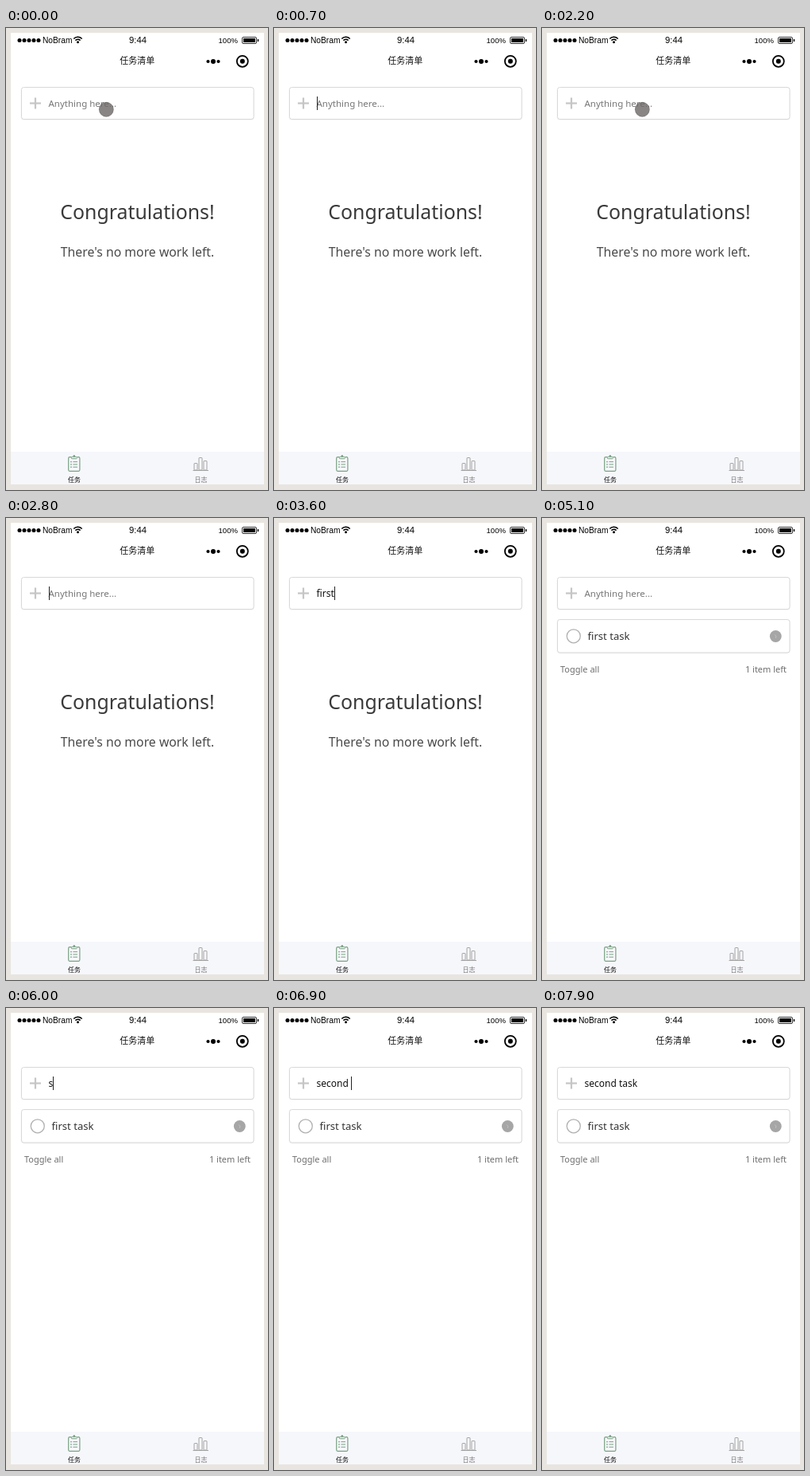
Write an HTML page with a canvas that moves like this. It is 330 px wide and 580 px high and loops after 8 s.

```html
<!DOCTYPE html>
<html lang="en">
<head>
<meta charset="utf-8">
<title>Task list</title>
<style>
  html, body { margin: 0; width: 100%; height: 100%; overflow: hidden; background: #e8e5e0; }
  canvas { display: block; width: 330px; height: 580px; }
</style>
</head>
<body>
<canvas id="stage"></canvas>
<script>
const LOOP = 8000;
const LATIN = '"Noto Sans", sans-serif';
const CJK = '"Noto Sans CJK SC", "Noto Sans CJK", sans-serif';
const STATUS = '"Liberation Sans", Arial, sans-serif';

const canvas = document.getElementById('stage');
const ctx = canvas.getContext('2d');
const ratio = window.devicePixelRatio || 1;
canvas.width = 330 * ratio;
canvas.height = 580 * ratio;

// Each entry: start time and the number of characters typed by then.
const first = { text: 'first task', keys: [
  [3300, 0], [3400, 1], [3500, 3], [3600, 5], [3700, 6],
  [4000, 7], [4100, 8], [4200, 9], [4300, 10]] };
const second = { text: 'second task', keys: [
  [5500, 0], [5800, 1], [6200, 2], [6300, 3], [6400, 4], [6600, 5],
  [6700, 6], [6900, 7], [7100, 8], [7200, 9], [7300, 10], [7400, 11]] };
const SUBMIT = 5100;
const caretSpans = [[600, 1100], [1600, 2100], [2600, 3100], [3300, 4800], [5400, 7900]];
const pointerSpans = [[0, 100], [2100, 2600]];

const within = (t, spans) => spans.some(([a, b]) => t >= a && t < b);

function typed(t) {
  const entry = t < SUBMIT ? first : second;
  const key = entry.keys.filter(k => k[0] <= t).pop();
  return key ? entry.text.slice(0, key[1]) : null;
}

function text(str, x, y, font, color, align = 'left') {
  ctx.font = font;
  ctx.fillStyle = color;
  ctx.textAlign = align;
  ctx.fillText(str, x, y);
}

function rect(x, y, w, h, color) {
  ctx.fillStyle = color;
  ctx.fillRect(x, y, w, h);
}

function disc(x, y, r, color) {
  ctx.fillStyle = color;
  ctx.beginPath();
  ctx.arc(x, y, r, 0, Math.PI * 2);
  ctx.fill();
}

function ring(x, y, r, color, width, from = 0, to = Math.PI * 2) {
  ctx.strokeStyle = color;
  ctx.lineWidth = width;
  ctx.beginPath();
  ctx.arc(x, y, r, from, to);
  ctx.stroke();
}

function box(x, y, w, h, r, color, width = 1) {
  ctx.strokeStyle = color;
  ctx.lineWidth = width;
  ctx.beginPath();
  ctx.roundRect(x, y, w, h, r);
  ctx.stroke();
}

function line(points, color, width) {
  ctx.strokeStyle = color;
  ctx.lineWidth = width;
  ctx.beginPath();
  points.forEach(([x, y]) => ctx.lineTo(x, y));
  ctx.stroke();
}

function statusBar() {
  for (let i = 0; i < 5; i++) disc(17 + i * 6, 15.5, 2.5, '#000');
  text('NoBram', 46, 18.5, '10.2px ' + STATUS, '#000');
  for (const r of [4.2, 7.2]) ring(90.5, 18.5, r, '#000', 1.6, -Math.PI * 0.76, -Math.PI * 0.24);
  disc(90.5, 17.8, 1.5, '#000');
  text('9:44', 166, 18.5, '11.3px ' + STATUS, '#000', 'center');
  text('100%', 292, 18.5, '9.6px ' + STATUS, '#000', 'right');
  box(297.5, 11.5, 18, 8, 1.5, '#000', 0.8);
  rect(299, 13, 15, 5, '#000');
  rect(316.8, 14, 1.4, 3, '#000');
}

function navBar() {
  text('任务清单', 165.2, 45.2, '500 11px ' + CJK, '#111', 'center');
  disc(254.5, 42, 2.1, '#000');
  disc(261, 42, 3, '#000');
  disc(267.5, 42, 2.1, '#000');
  ring(297.8, 41.8, 7, '#000', 1.8);
  disc(297.8, 41.8, 3, '#000');
}

function tabBar() {
  rect(6, 532, 319, 41, '#f6f7fb');
  const green = '#79a083', gray = '#a3a3a3';
  box(78.7, 538.7, 14.2, 17.6, 1.5, green, 1.2);
  rect(82, 537, 7.6, 4, '#f6f7fb');
  box(82.3, 538.3, 7, 2.4, 0.8, green);
  disc(85.8, 537.2, 1.2, green);
  for (let i = 0; i < 3; i++) {
    const y = 544.5 + i * 3.3;
    rect(81.2, y - 0.6, 1.6, 1.4, green);
    rect(84.4, y - 0.4, 5.6, 1, green);
  }
  text('任务', 86, 569.5, '8px ' + CJK, '#111', 'center');

  box(237, 546.5, 4, 8.5, 0.5, gray);
  box(243, 539.5, 4, 15.5, 0.5, gray);
  box(249, 543.5, 4, 11.5, 0.5, gray);
  line([[235.5, 555.5], [255, 555.5]], gray, 1);
  text('日志', 245.5, 569.5, '8px ' + CJK, '#777', 'center');
}

function card(y, h) {
  ctx.save();
  ctx.shadowColor = 'rgba(0,0,0,.12)';
  ctx.shadowBlur = 2 * ratio;
  ctx.shadowOffsetY = ratio * 0.5;
  ctx.fillStyle = '#fff';
  ctx.beginPath();
  ctx.roundRect(19.5, y, 292.5, h, 3);
  ctx.fill();
  ctx.restore();
  box(19.5, y, 292.5, h, 3, '#d9d9d9');
}

function input(t) {
  card(74.5, 40);
  rect(30, 93.4, 14, 2.2, '#c6c6c6');
  rect(35.9, 87.5, 2.2, 14, '#c6c6c6');
  const value = typed(t);
  if (value === null) text('Anything here...', 53.5, 98.5, '11.5px ' + LATIN, '#777');
  else text(value, 53.5, 98.5, '12px ' + LATIN, '#111');
  if (within(t, caretSpans)) {
    const x = 53.5 + (value ? ctx.measureText(value).width : 0);
    rect(Math.round(x), 86, 1, 17, '#222');
  }
}

function emptyState() {
  text('Congratulations!', 165.5, 239.5, '24.9px ' + LATIN, '#3a3a3a', 'center');
  text("There's no more work left.", 165.5, 286.5, '15.8px ' + LATIN, '#4a4a4a', 'center');
}

function taskList() {
  card(127.5, 41.5);
  ring(39.8, 148.3, 8.5, '#b0b0b0', 1.3);
  text('first task', 57.5, 152.8, '13.1px ' + LATIN, '#333');
  disc(294.3, 148.5, 7.4, '#a6a6a6');
  line([[293.3, 146.6], [294.8, 148.4], [294.3, 150.8]], '#c6c6c6', 0.9);
  text('Toggle all', 23, 193.5, '11px ' + LATIN, '#6f6f6f');
  text('1 item left', 308, 193.5, '11px ' + LATIN, '#6f6f6f', 'right');
}

function draw(t) {
  ctx.setTransform(ratio, 0, 0, ratio, 0, 0);
  rect(0, 0, 330, 580, '#e8e5e0');
  rect(6, 6, 319, 567, '#fff');
  statusBar();
  navBar();
  tabBar();
  input(t);
  if (t < SUBMIT) emptyState();
  else taskList();
  if (within(t, pointerSpans)) {
    disc(126.3, 102.3, 9.2, 'rgba(112,106,106,.82)');
    ring(126.3, 102.3, 9, 'rgba(90,86,86,.35)', 0.8);
  }
}

const start = performance.now();
function tick(now) {
  draw(Math.max(0, now - start) % LOOP);
  requestAnimationFrame(tick);
}
draw(0);
requestAnimationFrame(tick);
</script>
</body>
</html>
```
